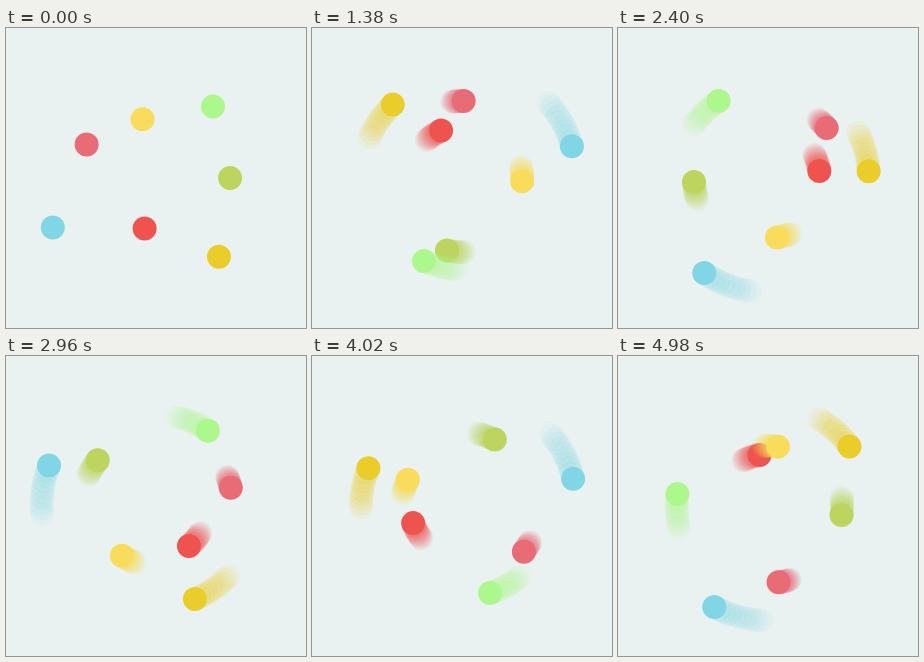
Write an HTML page with a canvas that moves like this. It is 300 px wide and 300 px high and loops after 5 s.

```html
<!DOCTYPE html>
<html lang="en">
<head>
<meta charset="utf-8">
<title>Orbiting dots</title>
<style>
  html, body { margin: 0; width: 100%; height: 100%; overflow: hidden; background: #eaf2f1; }
  canvas { display: block; width: 300px; height: 300px; }
</style>
</head>
<body>
<canvas id="stage" width="300" height="300"></canvas>
<script>
const LOOP = 5000, STEP = 20, TAIL = 9, SIZE = 12, CENTER = 150;

// Angles in degrees, speed in degrees per second; drawn back to front.
const dots = [
  { color: '#ef5350', radius: 51.8, start: 102.7, speed: 103.98 },
  { color: '#e86b76', radius: 77, start: 205.7, speed: 47.47 },
  { color: '#bdd45e', radius: 74.1, start: 0, speed: 73.7 },
  { color: '#f9dc5c', radius: 60.2, start: 257.1, speed: 76.8 },
  { color: '#acf88c', radius: 91.4, start: -51.4, speed: 120.28 },
  { color: '#eacd2a', radius: 100.9, start: 51.4, speed: 127 },
  { color: '#80d6e4', radius: 114.4, start: 154.4, speed: 137.27 }
];

const canvas = document.getElementById('stage');
const ctx = canvas.getContext('2d');
const scale = window.devicePixelRatio || 1;
canvas.width = canvas.height = 300 * scale;
ctx.scale(scale, scale);

function drawDot(dot, step, alpha) {
  const angle = (dot.start + dot.speed * step * STEP / 1000) * Math.PI / 180;
  ctx.globalAlpha = alpha;
  ctx.fillStyle = dot.color;
  ctx.beginPath();
  ctx.arc(CENTER + dot.radius * Math.cos(angle), CENTER + dot.radius * Math.sin(angle), SIZE, 0, Math.PI * 2);
  ctx.fill();
}

function draw(step) {
  ctx.globalAlpha = 1;
  ctx.fillStyle = '#eaf2f1';
  ctx.fillRect(0, 0, 300, 300);
  for (const dot of dots) {
    for (let age = Math.min(TAIL, step); age > 0; age--) {
      drawDot(dot, step - age, 0.09 + 0.1 * (1 - age / TAIL));
    }
    drawDot(dot, step, 1);
  }
}

const begin = performance.now();
function tick() {
  draw(Math.floor((performance.now() - begin) % LOOP / STEP));
  requestAnimationFrame(tick);
}
draw(0);
requestAnimationFrame(tick);
</script>
</body>
</html>
```
